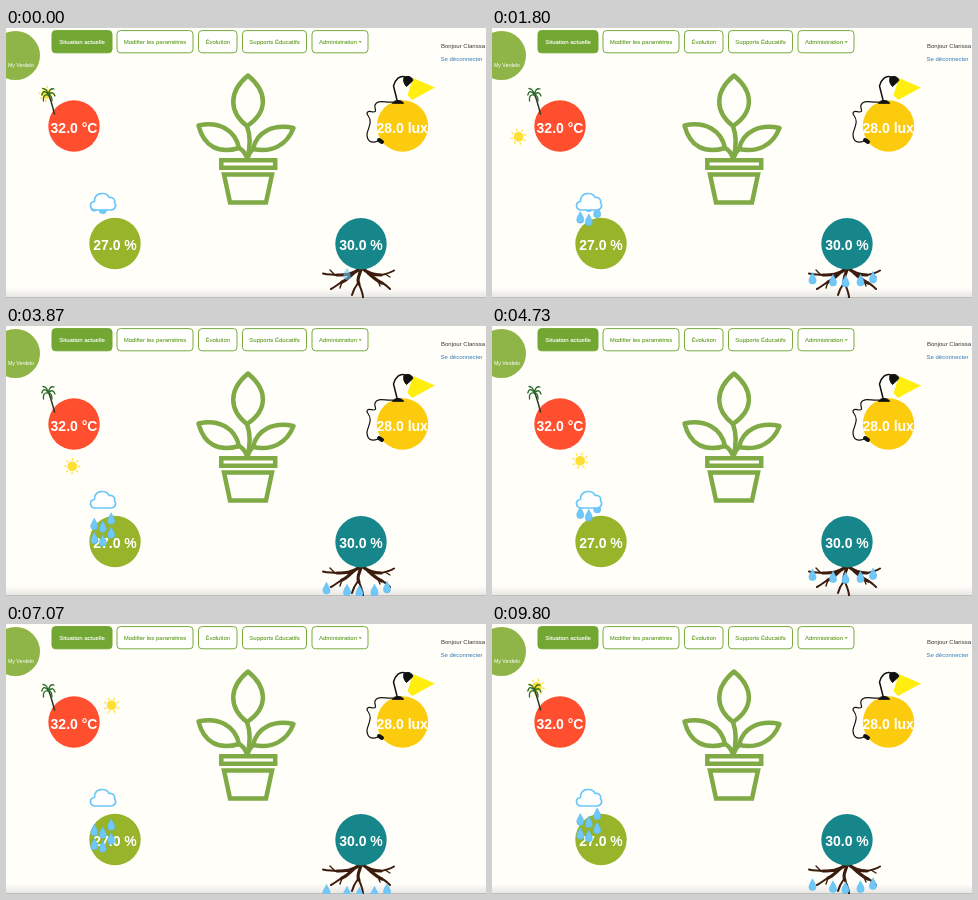
An HTML page for the animation above (9.87 s loop, 480 by 270 pixels).

```html
<!DOCTYPE html>
<html lang="fr">
<head>
<meta charset="utf-8">
<title>Situation actuelle</title>
<style>
html, body { margin: 0; width: 100%; height: 100%; overflow: hidden; background: #fffef9; }
svg { display: block; width: 100vw; height: 100vh; }
text { font-family: "Liberation Sans", Arial, sans-serif; font-size: 6px; }
.nav rect { fill: #fffffd; stroke: #78ab40; stroke-width: 1; }
.nav text { fill: #6ca332; stroke: #6ca332; stroke-width: .12; text-anchor: middle; }
.nav .on rect { fill: #71a732; stroke: #71a732; }
.nav .on text { fill: #fff; stroke: #fff; }
.value { font-size: 14px; font-weight: bold; fill: #fff; text-anchor: middle; }
.line { fill: none; stroke-linecap: round; stroke-linejoin: round; }
.drop { fill: #70c8f8; stroke: #55b4ec; stroke-width: .5; }
</style>
</head>
<body>
<svg viewBox="0 0 480 270">
  <defs>
    <path id="drop" class="drop" d="M0-6C1-3.400 3.600-.5 3.600 2.200A3.600 3.500 0 0 1-3.600 2.200C-3.600-.5-1-3.400 0-6Z"/>
    <clipPath id="below"><rect x="78" y="176" width="40" height="94"/></clipPath>
    <linearGradient id="edge" x2="0" y2="1">
      <stop offset="0" stop-color="#fffef9"/><stop offset="1" stop-color="#e6e5e1"/>
    </linearGradient>
  </defs>
  <rect width="480" height="270" fill="#fffef9"/>
  <rect y="260" width="480" height="10" fill="url(#edge)"/>
  <rect y="269" width="480" height="1" fill="#bdbdba"/>

  <circle cx="9.5" cy="27.5" r="24.5" fill="#8fb548"/>
  <text x="2" y="38.5" fill="#fff" style="font-size:5.2px">My Verdelo</text>

  <g class="nav" id="nav"></g>
  <text x="435" y="19.5" fill="#333">Bonjour Clarissa</text>
  <text x="434.5" y="32.5" fill="#337ab7">Se déconnecter</text>

  <g class="line" stroke="#7faa45" stroke-width="4.500">
    <path d="M242 47.500C222 64 223 84 241 98C262 84 262 64 242 47.500Z"/>
    <path d="M241 98C245 109 244 120 241.500 130"/>
    <path d="M192.500 97.500C198 119 213 126 233 120C229 102 213 93 192.500 97.500Z"/>
    <path d="M233 120C237 122 239 125 240.500 129"/>
    <path d="M287.500 100C268 96 251 103 247 121C266 125 281 117 287.500 100Z"/>
    <path d="M247 121C245 123 243 126 242 129"/>
    <path d="M215.300 132.300H269.200V139.800H215.300Z" stroke-linejoin="miter"/>
    <path d="M218 146.500H266L260 174.500H224Z" stroke-linejoin="miter"/>
  </g>

  <g id="sun" fill="#ffdf33"></g>
  <circle cx="68" cy="98" r="25.700" fill="#ff4f2f"/>
  <g class="line">
    <path d="M48.500 86C47 80 45.500 74 42.800 67" stroke="#2a3a20" stroke-width="1.500"/>
    <path d="M42.500 67C39 62 37 63 35.800 67M42.500 67C38 66 37 69 37.500 73M42.500 67C41 62 40 61 37 60.500M42.500 67C43 62 45 60 48 61M42.500 67C46 63 48 65 49 68M42.500 67C45 67 46 70 46 73" stroke="#2a6a2c" stroke-width="1.300"/>
  </g>
  <text class="value" x="68" y="105">32.0 °C</text>

  <circle cx="396.500" cy="98" r="25.700" fill="#fdcb0d"/>
  <path d="M407 50L429 59.500L406 72L401.500 67Z" fill="#ffee10"/>
  <g class="line" stroke="#111">
    <path d="M391 72L387.500 58C389 52 394 46 400 49.500" stroke-width="1.500"/>
    <path d="M398 50C401 46 408 50 406.500 53L400.500 58.500C398 56 397 53 398 50Z" fill="#111" stroke-width="1"/>
    <path d="M386.500 75C388 71.500 396 71.500 397.500 75Z" fill="#111" stroke-width="1"/>
    <path d="M387 74C380 75 371 71 369 77C368 81 372 84 367 84C361 82 360 85 362 87.500C367 94 362 100 361 106C361 113 365 116 372 113" stroke-width="1.200"/>
    <path d="M373 112L376 114" stroke-width="4"/>
  </g>
  <text class="value" x="396.200" y="105">28.0 lux</text>

  <circle cx="109" cy="215.500" r="25.700" fill="#97b42a"/>
  <text class="value" x="109" y="222">27.0 %</text>
  <g clip-path="url(#below)"><g id="rain"></g></g>
  <path class="line" d="M89.500 182C83 182 83 173.500 88.500 173.500C88 164.500 100.500 163 103 169.500C107 168.500 109.500 172 108.500 175C111 177.500 109 182 105 182Z" style="fill:#fff" stroke="#6cc6f7" stroke-width="1.700"/>

  <g class="line" stroke="#3c1c0c">
    <path d="M355 241C354 247 350 251 353 256M357 241C363 246 369 247 375 247M353 241C347 247 338 247 331 247M349 244C344 248 341 252 336 254M362 245C367 249 371 253 376 255" stroke-width="3.200"/>
    <path d="M331 247C326 246 322 247 317 245.500M375 247C380 246 384 245 388 242.500M336 254C332 256 329 259 325 261M376 255C379 256 381 258 384 261M353 256C355 261 357 265 357 270M352 255C349 259 347 263 346 267" stroke-width="2"/>
    <path d="M329 247L324 242M336 254L334 260M379 246L384 249M372 253L374 258" stroke-width="1.400"/>
  </g>
  <g id="soil"></g>
  <circle cx="355" cy="215.800" r="25.700" fill="#17868b"/>
  <text class="value" x="355" y="222">30.0 %</text>
</svg>
<script>
const $ = id => document.getElementById(id);
const use = (x, y) => `<use href="#drop" x="${x}" y="${y}"/>`;

$('nav').innerHTML = [
  ['Situation actuelle', 46, 106], ['Modifier les paramètres', 111, 187],
  ['Évolution', 192.5, 231], ['Supports Éducatifs', 236.5, 300.5], ['Administration', 306, 362]
].map(([label, a, b], i) => {
  const mid = (a + b) / 2;
  return `<g class="${i ? '' : 'on'}"><rect x="${a}" y="2.600" width="${b - a}" height="22.200" rx="3.500"/>` +
    `<text x="${i == 4 ? mid - 2 : mid}" y="16">${label}</text></g>`;
}).join('') + '<path d="M352.500 13.300h3.400l-1.700 1.800z" fill="#72a837"/>';

let rays = '<circle r="4.900"/>';
for (let a = 0; a < 360; a += 45)
  rays += `<path d="M-1-6L0-9L1-6Z" transform="rotate(${a})"/>`;
$('sun').innerHTML = rays;

$('rain').innerHTML = [[88.3, 177.5], [96.8, 180], [105.2, 172]]
  .map(([x, y]) => use(x, y) + use(x, y - 14)).join('');
$('soil').innerHTML = [[341, 246], [320.5, 244], [353.5, 247], [368.5, 246], [381, 243]]
  .map(([x, y]) => use(x, y)).join('');

const LOOP = 9870, FPS = 15, FALL = 1.5;

function draw(now) {
  const ms = Math.floor(now % LOOP / 10) * 10;
  const t = Math.floor((ms + 5) * FPS / 1000) / FPS;
  const turn = 129.5 + 36 * t, a = turn * Math.PI / 180;
  $('sun').setAttribute('transform',
    `translate(${67.2 + 42 * Math.cos(a)} ${98.3 - 42 * Math.sin(a)}) rotate(${-turn})`);

  const p = (t + 1e-6) % FALL;
  $('rain').setAttribute('transform', `translate(0 ${40 * p})`);
  $('soil').setAttribute('transform', `translate(0 ${21 * p})`);
  [...$('soil').children].forEach((d, i) => d.setAttribute('opacity', Math.min(1, p / 0.2 + (i ? 0 : 0.6))));
}

const start = performance.now();
function tick() {
  draw(performance.now() - start);
  requestAnimationFrame(tick);
}
tick();
</script>
</body>
</html>
```
